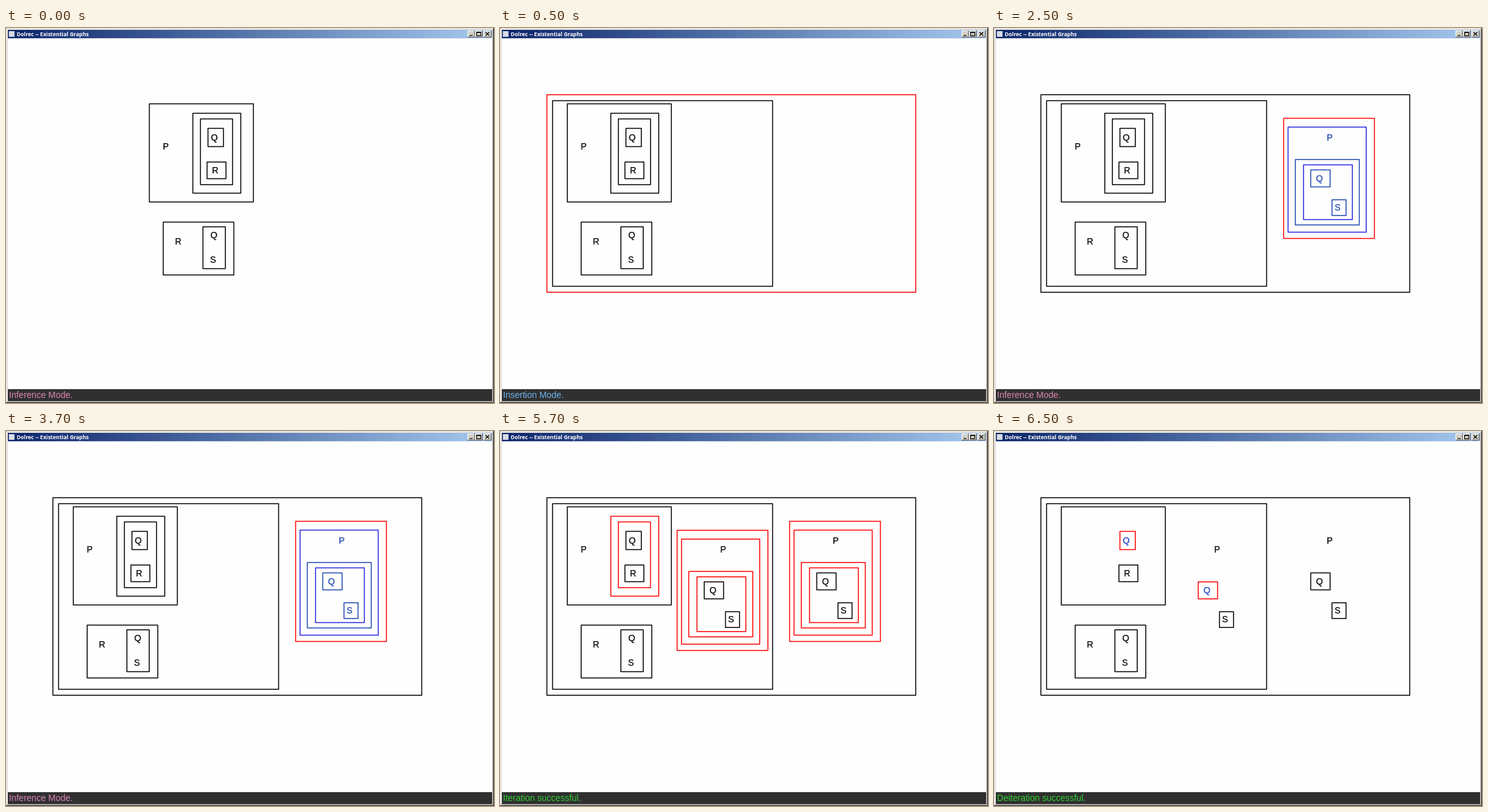
An HTML page that plays this animation: 774x596 px, repeating every 8 s.

```html
<!DOCTYPE html>
<html lang="en">
<head>
<meta charset="utf-8">
<title>Existential graphs</title>
<style>
  html, body { margin: 0; width: 100%; height: 100%; overflow: hidden; background: #d4d0c8; }
  svg { display: block; width: 774px; height: 596px; }
  .cut { fill: none; stroke-width: 1.5; stroke-linejoin: round; }
  .letter { font: 14px "Liberation Sans", Arial, sans-serif; text-anchor: middle; stroke-width: .25; }
  .status { font: 14px "Liberation Sans", Arial, sans-serif; }
  .title { font: 700 8.5px "Open Sans", "Noto Sans", sans-serif; fill: #fff; }
</style>
</head>
<body>
<svg viewBox="0 0 774 596">
  <defs>
    <linearGradient id="bar"><stop stop-color="#0a246a"/><stop offset="1" stop-color="#a6caf0"/></linearGradient>
  </defs>
  <rect width="774" height="596" fill="#d4d0c8"/>
  <path d="M1.5 595V1.5H773" fill="none" stroke="#fff"/>
  <path d="M772.5 1V594.5H1" fill="none" stroke="#808080"/>
  <path d="M773.5 0V595.5H0" fill="none" stroke="#404040"/>
  <rect x="3" y="3" width="768" height="13.5" fill="url(#bar)"/>
  <rect x="4.5" y="5" width="9" height="9" fill="#d8dde6"/>
  <text class="title" x="17" y="12.9">Dolrec -- Existential Graphs</text>
  <g id="buttons"></g>
  <rect x="3" y="16.5" width="768" height="557.5" fill="#fefefe"/>
  <rect x="3" y="574" width="768" height="19" fill="#303030"/>
  <g id="scenes"></g>
</svg>
<script>
const BLACK = '#000', RED = '#f00', BLUE = '#2424e0', NAVY = '#1f47b0';
const LOOP = 8000;

const cut = (x1, y1, x2, y2, color = BLACK) =>
  `<rect class="cut" x="${x1 + .4}" y="${y1 + .4}" width="${x2 - x1}" height="${y2 - y1}" stroke="${color}"/>`;
const letter = (ch, x, y, color = BLACK) =>
  `<text class="letter" x="${x}" y="${y + 5}" fill="${color}" stroke="${color}">${ch}</text>`;
const status = (text, color) =>
  `<text class="status" x="4.8" y="587.5" fill="${color}">${text}</text>`;
const shift = (dx, dy, body) => `<g transform="translate(${dx} ${dy})">${body}</g>`;

// P implies (Q or R)
const premiseBox = cut(227, 120, 392, 276);
const premiseCuts = color => cut(296, 135, 372, 262, color) + cut(308, 144, 359, 248.5, color);
const premiseLeaves = (box = BLACK, ink = BLACK) =>
  cut(320, 159, 344.5, 188, box) + letter('Q', 330.5, 173.5, ink) +
  cut(318.5, 212.5, 348.5, 239) + letter('R', 331.7, 226);
const premise = color =>
  premiseBox + letter('P', 253.3, 187.5) + premiseCuts(color) + premiseLeaves();

// R implies (Q and S)
const rule = cut(249, 308, 361, 392) + cut(312, 315.5, 347.5, 382) +
  letter('R', 273, 338.5) + letter('Q', 329.7, 328.5) + letter('S', 328.3, 367.5);

// P implies (Q or S)
const goalCuts = (a, b = a, c = a) =>
  cut(459, 143, 603, 334, a) + cut(466, 157, 590, 324, b) +
  cut(477.5, 208.5, 579, 312.5, c) + cut(490.5, 217, 568, 304, b);
const goalLeaves = (ink = BLACK, qBox = ink, qInk = ink) =>
  letter('P', 532.3, 173.5, ink) +
  cut(502, 225, 532.7, 252, qBox) + letter('Q', 516.3, 238.5, qInk) +
  cut(535.7, 272.5, 558, 297.5, ink) + letter('S', 545, 284.7, ink);

const left = body => shift(-120.7, 0, body);
const copy = body => shift(-178.5, 14.3, body);
const frame = color => cut(74, 105.5, 659, 419.5, color) + cut(83, 115, 432, 410);

const steps = [
  [0, premise() + rule + status('Inference Mode.', '#dc86b4')],
  [500, frame(RED) + left(premise() + rule) + status('Insertion Mode.', '#6cb4f0')],
  [2500, frame() + left(premise() + rule) + goalCuts(RED, BLUE, NAVY) + goalLeaves(NAVY) +
    status('Inference Mode.', '#dc86b4')],
  [4500, frame() + left(premise(RED) + rule) + goalCuts(RED) + goalLeaves() +
    copy(goalCuts(RED) + goalLeaves()) + status('Iteration successful.', '#30d030')],
  [6500, frame() + left(premiseBox + premiseLeaves(RED, '#2040c8') + rule) + goalLeaves() +
    copy(goalLeaves(BLACK, RED, '#2040c8')) + status('Deiteration successful.', '#30d030')]
];

const button = (x, w, icon) =>
  `<rect x="${x}" y="4" width="${w}" height="11" fill="#d4d0c8"/>` +
  `<path d="M${x + .5} 15V4.5H${x + w}" fill="none" stroke="#fff"/>` +
  `<path d="M${x + w - .5} 4V14.5H${x}" fill="none" stroke="#505050"/>` +
  `<path d="${icon}" fill="none" stroke="#000" stroke-width="1.2"/>`;
document.getElementById('buttons').innerHTML =
  button(732, 11.5, 'M735 12H740') +
  button(744, 12, 'M746.5 6.5H753V12.3H746.5ZM746.5 7.2H753') +
  button(757.5, 12.5, 'M760.5 6.5L766.5 12.3M766.5 6.5L760.5 12.3');

const scenes = document.getElementById('scenes');
scenes.innerHTML = steps.map(([, body]) => `<g display="none">${body}</g>`).join('');

let shown = -1;
function draw() {
  const t = performance.now() % LOOP;
  const now = steps.filter(([start]) => start <= t).length - 1;
  if (now !== shown) {
    [...scenes.children].forEach((g, i) => g.setAttribute('display', i === now ? 'inline' : 'none'));
    shown = now;
  }
  requestAnimationFrame(draw);
}
draw();
</script>
</body>
</html>
```
